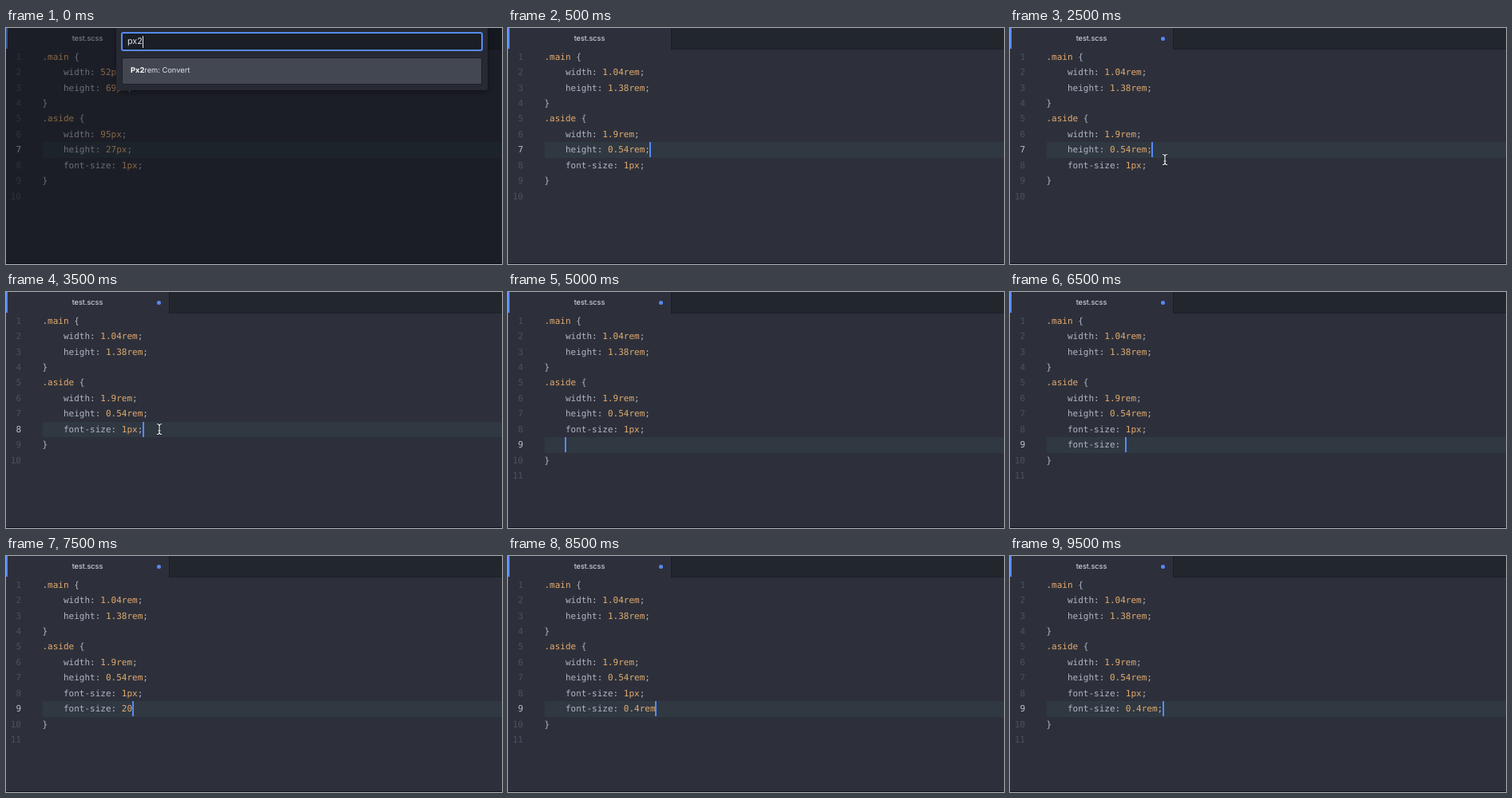
Recreate the animation shown at these times as an HTML page. Size 621x296 px, loop 10 s.

```html
<!DOCTYPE html>
<html lang="en">
<head>
<meta charset="utf-8">
<title>test.scss</title>
<style>
  html, body { margin: 0; width: 100%; height: 100%; overflow: hidden; background: #2d303b; }
  #stage { position: relative; width: 621px; height: 296px; overflow: hidden; background: #2d303b;
    text-rendering: geometricPrecision; font-family: Inter, Roboto, sans-serif; }
  #stage div, #stage svg { position: absolute; box-sizing: border-box; white-space: pre; }
  .mono, .num { font: 11px/19.45px "DejaVu Sans Mono", "Liberation Mono", monospace; color: #b0b6c2; }
  .num { left: 0; width: 19px; text-align: right; color: #4b515d; }
  .num.on { color: #b9bfca; }
  .mono i { font-style: normal; color: #e0aa6e; }
  .mono u { text-decoration: none; background: #ee6557; color: #fff; padding: 1px 0; }
  .row { left: 46px; right: 0; height: 19.45px; background: #303842; }
  .caret { width: 2px; height: 19px; background: #568af2; }
  .bar { left: 204px; top: 0; right: 0; height: 27px; background: #21272d; border-left: 1px solid #1a1d23;
    border-bottom: 1px solid #1c2026; }
  .edge { left: 0; top: 0; width: 2px; height: 26px; background: #568af2; }
  .name { left: 0; width: 204px; top: 6px; text-align: center; font-size: 9.2px; line-height: 15px; color: #e2e5eb; }
  .dot { left: 189px; top: 11px; width: 5px; height: 5px; border-radius: 50%; background: #568af2; }
  .foot { left: 0; right: 0; top: 295px; height: 1px; background: #12141a; }
  .menu { top: 202px; background: #20242c; overflow: hidden; }
  .item { left: 0; right: 0; height: 21.8px; color: #ccd1d9; line-height: 21.4px; }
  .item.on { background: #444954; }
  .item div { top: 0; left: 30px; line-height: 21.4px; color: #cfd3db; }
  .item b { color: #fff; }
  .item .kind { left: 0; width: 22px; height: 100%; text-align: center; background: #474b54; color: #b9bec7; }
  .item.on .kind { background: #5c616a; }
  .hint { left: 7px; font-size: 10.8px; line-height: 24px; color: #b3b8c2; }
  .hint span { color: #6494f5; }
  .shade { inset: 0; background: rgba(3, 7, 11, .41); }
  .palette { left: 138px; top: -6px; width: 465px; height: 84px; background: #272a33; border-radius: 3px;
    box-shadow: 0 2px 6px rgba(0, 0, 0, .45); }
  .input { left: 6px; top: 11px; width: 453px; height: 24px; border: 2px solid #568af2; border-radius: 3px;
    background: #1b1e25; color: #e0e4ea; font-size: 10.8px; line-height: 20px; padding-left: 6px; }
  .input div { left: 25px; top: 3px; width: 1px; height: 15px; background: #dfe5f0; }
  .pick { left: 7px; top: 43px; width: 451px; height: 34px; background: #434751; border: 1px solid #1c1f26;
    border-radius: 2px; color: #dde0e6; font-size: 9.3px; line-height: 32px; padding-left: 10px; }
  .pick b { color: #fff; }
</style>
</head>
<body>
<div id="stage"></div>
<script>
const LOOP = 10000, STEP = 500, CH = 6.622, LEFT = 45.5, PITCH = 19.45;
const stage = document.getElementById('stage');
const top0 = n => 26.6 + PITCH * (n - 1);
const box = (cls, style = '', body = '') => `<div class="${cls}" style="${style}">${body}</div>`;

const fProps = ['fill', 'filter', 'flex', 'flex-basis', 'flex-direction'];
const sizeProps = ['font-size', 'font-size-adjust'];

// Each entry changes the state from its time on.
const steps = [
  [0, { sizes: ['52px', '69px', '95px', '27px'], palette: true, line: 7, col: 0 }],
  [500, { sizes: ['1.04rem', '1.38rem', '1.9rem', '0.54rem'], palette: false, col: 20 }],
  [1000, { dot: true }],
  [1500, { mouse: [196, 171] }],
  [2000, { mouse: [194, 165], col: 0 }],
  [2500, { col: 20 }],
  [3000, { mouse: [192, 170] }],
  [3500, { mouse: [192, 172], line: 8, col: 19 }],
  [4000, { mouse: null, added: '', line: 9, col: 4 }],
  [4500, { col: 0 }],
  [5000, { col: 4 }],
  [5500, { added: '<u>f</u>', col: 0, menu: { x: 42, w: 579, h: 120, kind: 'p', hit: /[f]/, items: fProps } }],
  [6000, { added: '<u>fz</u>', menu: { x: 42, w: 579, h: 68, kind: 'p', hit: /[fz]/g, items: sizeProps,
    hint: 'Specifies the size of the font.  <span>More..</span>' } }],
  [6500, { added: 'font-size: ', menu: null, col: 15 }],
  [7000, { added: 'font-size: 20', col: 17 }],
  [8000, { added: 'font-size: 20px', col: 19,
    menu: { x: 115, w: 193, h: 23, kind: 's', hit: /^20px/, items: ['20px → 0.4rem'] } }],
  [8500, { added: 'font-size: 0.4rem', menu: null, col: 21 }],
  [9000, { added: 'font-size: 0.4rem;', col: 22 }]
];

const stateAt = t => Object.assign({}, ...steps.filter(s => s[0] <= t).map(s => s[1]));

const paint = s => s.replace(/^\.\w+|\d[\d.]*(px|rem)?/g, '<i>$&</i>');

function codeLines({ sizes: [a, b, c, d], added }) {
  const pad = '    ';
  const lines = ['.main {', `${pad}width: ${a};`, `${pad}height: ${b};`, '}',
    '.aside {', `${pad}width: ${c};`, `${pad}height: ${d};`, `${pad}font-size: 1px;`, '}', ''];
  if (added !== undefined) lines.splice(8, 0, pad + added);
  return lines;
}

function menuHtml(m) {
  const rows = m.items.map((text, i) => box(i ? 'item mono' : 'item mono on', `top:${i * 21.8}px`,
    box('kind mono', '', m.kind) + box('mono', '', text.replace(m.hit, '<b>$&</b>'))));
  const hint = m.hint ? box('hint', `top:${m.items.length * 21.8}px`, m.hint) : '';
  return box('menu', `left:${m.x}px;width:${m.w}px;height:${m.h}px`, rows.join('') + hint);
}

const mouseHtml = ([x, y]) =>
  `<svg style="left:${x - 5}px;top:${y - 8}px" width="10" height="16" fill="none">
    <path d="M2 1.5Q5 1.5 5 4V12Q5 14.5 2 14.5M8 1.5Q5 1.5 5 4M5 12Q5 14.5 8 14.5M3.5 10H6.5"
      stroke="#16181e" stroke-width="2.6"/>
    <path d="M2 1.5Q5 1.5 5 4V12Q5 14.5 2 14.5M8 1.5Q5 1.5 5 4M5 12Q5 14.5 8 14.5M3.5 10H6.5"
      stroke="#e9ebef" stroke-width="1.2"/></svg>`;

const paletteHtml = () => box('shade') + box('palette', '',
  box('input', '', 'px2' + box('')) + box('pick', '', '<b>Px2</b>rem: Convert'));

function draw(s) {
  let html = box('row', `top:${top0(s.line)}px`);
  codeLines(s).forEach((text, i) => {
    const y = `top:${top0(i + 1)}px`;
    html += box(i + 1 === s.line ? 'num on' : 'num', y, i + 1);
    html += box('mono', `${y};left:${LEFT}px`, paint(text));
  });
  if (s.col) html += box('caret', `left:${LEFT + s.col * CH - .5}px;top:${top0(s.line)}px`);
  html += box('bar') + box('edge') + box('name', '', 'test.scss');
  if (s.dot) html += box('dot');
  if (s.menu) html += menuHtml(s.menu);
  if (s.mouse) html += mouseHtml(s.mouse);
  html += box('foot');
  if (s.palette) html += paletteHtml();
  stage.innerHTML = html;
}

const start = performance.now();
let shown = -1;
function tick(now) {
  const k = Math.floor((Math.max(0, now - start) % LOOP) / STEP);
  if (k !== shown) draw(stateAt((shown = k) * STEP));
  requestAnimationFrame(tick);
}
tick(start);
</script>
</body>
</html>
```
